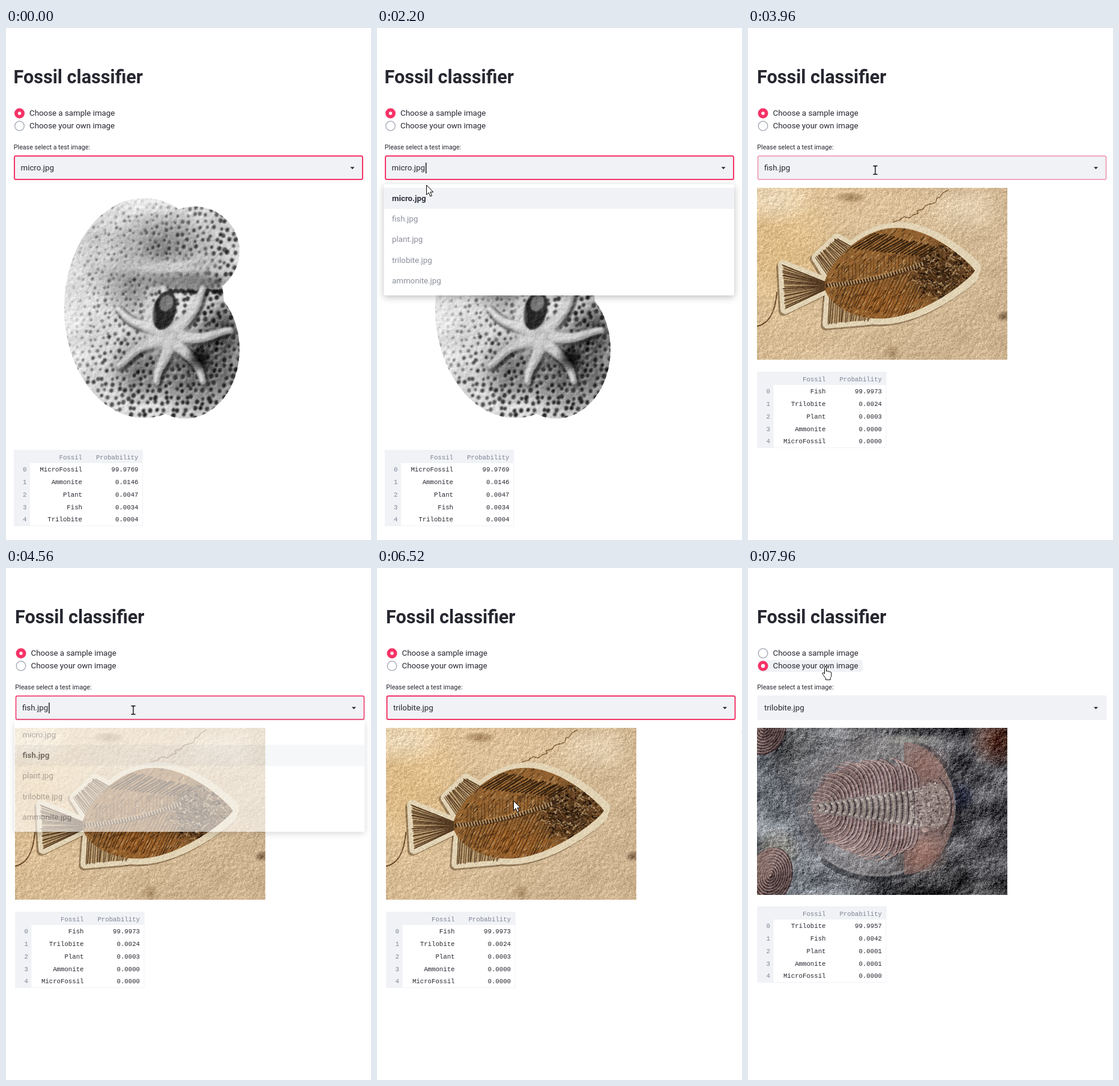
Recreate the animation shown at these times as an HTML page with a canvas. Size 608 by 852 pixels, loop 8000 ms.

```html
<!DOCTYPE html>
<html lang="en">
<head>
<meta charset="utf-8">
<title>Fossil classifier</title>
<style>
html, body { margin: 0; width: 100%; height: 100%; overflow: hidden; background: #fff; }
#stage { position: relative; width: 608px; height: 852px; overflow: hidden; background: #fff; }
canvas, svg { position: absolute; left: 0; top: 0; }
canvas { top: 266px; }
text { font: 13.3px Roboto, sans-serif; fill: #262730; }
.title { font-size: 30.6px; font-weight: 700; }
.label { font-size: 10.7px; }
.mono { font: 10.7px "Liberation Mono", monospace; text-anchor: end; }
.dim { fill: #7f8494; }
#sheet { filter: drop-shadow(0 3px 6px rgba(0, 0, 0, .25)); }
</style>
</head>
<body>
<div id="stage"></div>
<script>
const LOOP = 8000, STEP = 40;
const stage = document.getElementById('stage');
const lerp = (a, b, p) => a + (b - a) * p;
const ramp = (t, a, b) => Math.min(1, Math.max(0, (t - a) / (b - a)));
const ease = p => p * p * (3 - 2 * p);

/* ---------- painting helpers ---------- */
let seed = 7;
function rnd(a = 0, b = 1) {
  seed = (seed * 1664525 + 1013904223) % 4294967296;
  return a + (b - a) * seed / 4294967296;
}
function hash(x, y) {
  const n = Math.sin(x * 127.1 + y * 311.7) * 43758.5453;
  return n - Math.floor(n);
}
function noise(x, y) {
  const i = Math.floor(x), j = Math.floor(y), u = ease(x - i), v = ease(y - j);
  return lerp(lerp(hash(i, j), hash(i + 1, j), u), lerp(hash(i, j + 1), hash(i + 1, j + 1), u), v);
}
// Lit bumps, broad patches and fine grain over everything painted so far.
function rough(c, size, relief, grain, patch = 0) {
  const { width: w, height: h } = c.canvas, img = c.getImageData(0, 0, w, h), d = img.data;
  const bump = (x, y) => noise(x / size, y / size) + .5 * noise(x * 2.7 / size, y * 2.7 / size);
  for (let y = 0; y < h; y++) for (let x = 0; x < w; x++) {
    const k = (y * w + x) * 4;
    if (!d[k + 3]) continue;
    const add = (bump(x + 1.5, y + 1.5) - bump(x, y)) * relief + (hash(x, y) - .5) * grain
      + (noise(x / 34, y / 28) - .5) * patch;
    for (let n = 0; n < 3; n++) d[k + n] += add;
  }
  c.putImageData(img, 0, 0);
}
function blur(c, r) {
  c.save();
  c.setTransform(1, 0, 0, 1, 0, 0);
  c.globalCompositeOperation = 'source-atop';
  c.filter = `blur(${r}px)`;
  c.drawImage(c.canvas, 0, 0);
  c.restore();
}
function soft(c, x, y, rx, ry, rgb, a) {
  const g = c.createRadialGradient(0, 0, 0, 0, 0, 1);
  g.addColorStop(0, `rgba(${rgb},${a})`);
  g.addColorStop(.5, `rgba(${rgb},${a * .6})`);
  g.addColorStop(1, `rgba(${rgb},0)`);
  c.save();
  c.translate(x, y);
  c.scale(rx, ry);
  c.fillStyle = g;
  c.fillRect(-1, -1, 2, 2);
  c.restore();
}
function fill(c, color) { c.fillStyle = color; c.fill(); }
function pen(c, color, w) { c.strokeStyle = color; c.lineWidth = w; c.stroke(); }
function oval(c, x, y, rx, ry, color, turn = 0) {
  c.beginPath();
  c.ellipse(x, y, rx, ry, turn, 0, 7);
  fill(c, color);
}
function line(c, x, y, u, v, color, w) {
  c.beginPath();
  c.moveTo(x, y);
  c.lineTo(u, v);
  pen(c, color, w);
}
function curve(c, x, y, cx, cy, u, v, color, w) {
  c.beginPath();
  c.moveTo(x, y);
  c.quadraticCurveTo(cx, cy, u, v);
  pen(c, color, w);
}
// n strokes between a base segment and a tip segment.
function rays(c, n, [ax, ay, bx, by], [px, py, qx, qy], color, w) {
  for (let i = 0; i < n; i++) {
    const s = i / (n - 1);
    line(c, lerp(ax, bx, s), lerp(ay, by, s),
      lerp(px, qx, s) + rnd(-2, 2), lerp(py, qy, s) + rnd(-2, 2), color, w * rnd(.6, 1.2));
  }
}
function picture(h, x, paint) {
  const cv = document.createElement('canvas');
  cv.width = 417;
  cv.height = h;
  stage.append(cv);
  const c = cv.getContext('2d', { willReadFrequently: true });
  c.lineCap = c.lineJoin = 'round';
  c.translate(-x, -266);
  paint(c);
  return cv;
}

/* ---------- pictures ---------- */
function paintMicro(c) {
  c.save();
  c.beginPath();
  c.ellipse(230, 466, 133, 183, 0, 0, 7);
  c.closePath();
  c.ellipse(314, 371, 75, 74, 0, 0, 7);
  c.closePath();
  c.ellipse(298, 535, 91, 115, 0, 0, 7);
  fill(c, '#d4d4d4');
  c.clip();
  soft(c, 325, 560, 95, 85, '15,15,15', .75);
  soft(c, 365, 500, 45, 60, '15,15,15', .7);
  soft(c, 225, 570, 60, 60, '30,30,30', .5);
  soft(c, 265, 365, 95, 70, '40,40,40', .45);
  soft(c, 205, 430, 55, 65, '40,40,40', .4);
  for (let row = 0; row < 34; row++) for (let col = 0; col < 26; col++) {
    const x = 96 + col * 12 + row % 2 * 6 + rnd(-4, 4), y = 290 + row * 10.8 + rnd(-3.5, 3.5);
    const deep = ramp(x + y * .6, 310, 620), r = 1.2 + 1.7 * deep + rnd(-.5, .8), a = .3 + .5 * deep + rnd(-.15, .1);
    oval(c, x + 1.2, y + 1.5, r + 2, r + 2, 'rgba(235,235,235,.3)');
    oval(c, x, y, r + .9, r + 1.1, `rgba(70,70,70,${a * .5})`, .4);
    oval(c, x, y, r, r * 1.2, `rgba(18,18,18,${a})`, .4);
  }
  soft(c, 245, 398, 120, 20, '215,215,215', .9);
  soft(c, 325, 392, 50, 22, '190,190,190', .7);
  soft(c, 302, 423, 85, 22, '105,105,105', 1);
  soft(c, 302, 425, 70, 12, '135,135,135', .9);
  for (let x = 256; x < 370; x += 3)
    oval(c, x, 438 + rnd(-2, 2), 3, rnd(1.5, 4), '#222');

  // Spokes of overlapping discs: a shadow pass, then two lighter ones.
  const spokes = [0, 1, 2, 3, 4, 5, 6];
  for (const [d, grow, color] of [[3, 3, 'rgba(40,40,40,.28)'], [0, 0, '#a6a6a6'], [-1.5, -3, '#d2d2d2']])
    for (const i of spokes) for (let s = .2; s <= 1; s += .04) {
      const a = i * .9 + .09 * Math.sin(s * 5 + i * 2), len = 95 + 12 * Math.sin(i * 2 + 1);
      oval(c, 273 + d + len * s * Math.cos(a), 512 + d + len * s * Math.sin(a),
        Math.max(1, lerp(11, 5.5, s) + grow), Math.max(1, lerp(11, 5.5, s) + grow), color);
    }
  soft(c, 268, 514, 58, 46, '208,208,208', 1);
  oval(c, 264, 470, 19, 33, '#2b2b2b', .25);
  oval(c, 267, 458, 11, 14, '#777', .5);
  soft(c, 237, 478, 14, 42, '222,222,222', .9);
  soft(c, 322, 550, 24, 26, '10,10,10', .9);
  soft(c, 105, 470, 45, 150, '240,240,240', .7);
  soft(c, 225, 288, 110, 25, '235,235,235', .7);
  blur(c, .9);
  c.restore();
  rough(c, 5, 34, 16, 26);
}

// Body outline, widened by `grow` for the chipped edge around it.
function fishBody(c, grow) {
  c.beginPath();
  for (let i = 0; i <= 80; i++) {
    const side = i <= 40 ? -1 : 1, s = (side < 0 ? i : 80 - i) / 40;
    const half = 8 * (1 - s) + 70 * Math.max(0, Math.sin(Math.PI * s ** .85)) ** .82 + grow * (1 - s * .3);
    c.lineTo(128 + s * (250 + grow), 428 - 24 * s + side * half - 10 * Math.sin(Math.PI * s));
  }
  c.closePath();
}
function paintFish(c) {
  const bg = c.createLinearGradient(15, 266, 432, 552);
  bg.addColorStop(0, '#dec093');
  bg.addColorStop(.5, '#d5bb96');
  bg.addColorStop(1, '#cbb18e');
  c.fillStyle = bg;
  c.fillRect(15, 266, 417, 286);
  soft(c, 60, 370, 110, 110, '225,188,130', .7);
  soft(c, 45, 285, 70, 45, '246,232,208', .7);
  soft(c, 365, 300, 70, 45, '236,220,194', .6);
  soft(c, 170, 282, 28, 10, '120,85,45', .6);
  soft(c, 426, 480, 14, 10, '90,65,40', .7);
  soft(c, 240, 540, 14, 14, '135,105,70', .5);
  c.beginPath();
  for (let s = 0; s <= 1; s += .05) c.lineTo(330 - 100 * s + rnd(-4, 4), 267 + 64 * s ** .7 + rnd(-3, 3));
  pen(c, '#80603a', 1.5);
  curve(c, 48, 440, 44, 490, 16, 496, '#67482a', 2);
  rough(c, 5, 34, 18, 14);

  const fins = [
    [[132, 424, 132, 434], [58, 394, 62, 468], 24],
    [[134, 414, 176, 366], [114, 382, 148, 350], 18],
    [[136, 440, 205, 474], [132, 492, 202, 486], 20],
    [[170, 366, 292, 380], [212, 341, 315, 366], 18]];
  const shape = ([b, t]) => {
    c.beginPath();
    c.moveTo(b[0], b[1]);
    c.lineTo(t[0], t[1]);
    c.lineTo(t[2], t[3]);
    c.lineTo(b[2], b[3]);
    c.closePath();
  };
  for (const [d, color] of [[-3, 'rgba(95,70,40,.55)'], [0, '#e2d3b5']]) {
    c.save();
    c.translate(d, -d);
    fins.forEach(f => { shape(f); pen(c, color, 16); });
    fishBody(c, 11);
    fill(c, color);
    c.restore();
  }
  fins.forEach(f => { shape(f); fill(c, '#b79a6f'); rays(c, f[2], f[0], f[1], '#543a22', 1.5); });

  c.save();
  fishBody(c, 0);
  fill(c, '#8f602f');
  c.clip();
  soft(c, 225, 455, 75, 35, '160,92,32', .7);
  for (let i = 0; i < 1100; i++) {
    const x = rnd(130, 310), y = rnd(330, 495), l = rnd(2, 7);
    line(c, x, y, x - l, y + l * 1.1,
      ['rgba(50,30,14,.6)', 'rgba(178,112,52,.6)', 'rgba(215,182,130,.45)'][i % 3], rnd(.7, 1.8));
  }
  rays(c, 28, [150, 424, 310, 388], [150, 398, 310, 362], 'rgba(60,36,16,.5)', 1.5);
  rays(c, 26, [152, 430, 310, 398], [140, 460, 270, 482], 'rgba(52,30,14,.6)', 1.7);
  soft(c, 325, 408, 66, 60, '42,26,14', .85);
  for (let i = 0; i < 620; i++) {
    const a = rnd(0, 6.3), r = Math.sqrt(rnd()), x = 328 + 52 * r * Math.cos(a), y = 408 + 46 * r * Math.sin(a);
    line(c, x, y, x + rnd(-6, 6), y + rnd(-5, 5),
      ['rgba(30,18,10,.8)', 'rgba(115,76,42,.7)', 'rgba(195,165,120,.6)'][i % 3], rnd(.8, 2.6));
  }
  c.restore();
  rays(c, 20, fins[3][0], fins[3][1], '#33200f', 2.2);
  curve(c, 132, 428, 220, 424, 296, 390, 'rgba(60,38,20,.7)', 7);
  for (let s = 0; s <= 1; s += .03) {
    const x = lerp(134, 292, s), y = 428 - 36 * s ** 1.5;
    line(c, x - 1, y - 3, x + 1, y + 3, '#c8ad82', 1.6);
  }
  blur(c, .5);
  rough(c, 3, 14, 24);
}

function paintTrilobite(c) {
  const bg = c.createLinearGradient(40, 500, 429, 330);
  bg.addColorStop(0, '#7a7f87');
  bg.addColorStop(.5, '#68686b');
  bg.addColorStop(1, '#454448');
  c.fillStyle = bg;
  c.fillRect(13, 266, 417, 278);
  soft(c, 75, 300, 55, 80, '45,44,42', .6);
  soft(c, 412, 285, 48, 50, '105,55,38', .75);
  soft(c, 350, 380, 30, 30, '35,40,75', .6);
  soft(c, 320, 545, 150, 40, '40,40,42', .8);
  soft(c, 45, 470, 45, 40, '110,98,72', .5);
  rough(c, 17, 110, 20, 60);
  rough(c, 6, 55, 20);
  oval(c, 212, 398, 132, 116, 'rgba(128,122,122,.35)');
  for (const [r, color, w] of [[136, 'rgba(35,34,38,.5)', 9], [128, 'rgba(165,163,163,.4)', 4]]) {
    c.beginPath();
    c.ellipse(214, 397, r, r * .89, 0, -1.1, 2.3);
    pen(c, color, w);
  }
  soft(c, 270, 286, 55, 10, '150,150,142', .8);

  c.beginPath();
  c.ellipse(258, 400, 84, 110, 0, -Math.PI / 2, Math.PI / 2);
  fill(c, 'rgba(132,106,101,.8)');
  soft(c, 290, 475, 45, 40, '160,105,90', .5);
  soft(c, 295, 330, 42, 40, '150,105,95', .5);
  oval(c, 206, 400, 100, 78, '#85716f');
  for (const side of [-1, 1]) for (let i = 0; i < 28; i++) {
    const s = i / 27, x = 116 + s * 164, y = 400 + side * (5 + 23 * s), a = Math.PI * (1 - .68 * s);
    const out = rnd(.96, 1.1), tx = 208 + 100 * out * Math.cos(a), ty = 400 + side * 79 * out * Math.sin(a);
    curve(c, x + 2.6, y, x + 2, ty, tx + 2.6, ty, '#55464a', 2);
    curve(c, x, y, x, ty, tx, ty, i % 3 ? '#ad9691' : '#a58884', rnd(1.6, 2.6));
  }
  for (let s = 0; s <= 1; s += 1 / 17) {
    const x = 118 + s * 168, h = 4 + 25 * s;
    curve(c, x, 399 - h, x + 5, 399, x, 399 + h, '#8f8481', 11);
    curve(c, x - 3, 399 - h, x + 2, 399, x - 3, 399 + h, '#50474a', 2.4);
    curve(c, x + 2, 399 - h, x + 7, 399, x + 2, 399 + h, '#b0a49d', 2.4);
    for (const side of [-1, 1]) oval(c, x, 399 + side * h, 2.4, 1.8, '#c2b6ad');
  }
  oval(c, 306, 395, 31, 38, '#8d7d79');
  for (let i = 0; i < 200; i++) {
    const a = rnd(0, 6.3), r = Math.sqrt(rnd());
    oval(c, 304 + 36 * r * Math.cos(a), 396 + 42 * r * Math.sin(a), rnd(.8, 2.4), rnd(.8, 2),
      i % 2 ? '#b0a39e' : '#5d4d4d');
  }
  oval(c, 295, 438, 11, 8, '#705b58');
  oval(c, 293, 436, 6, 4, '#a98f88');
  curve(c, 318, 350, 355, 395, 320, 442, 'rgba(50,42,45,.6)', 3);
  for (const [x, y] of [[26, 264], [36, 512]]) for (let k = 1; k > .1; k -= .1) {
    oval(c, x, y, 36 * k, 48 * k, '#4a3b3d', .25);
    oval(c, x - 1, y - 1, 36 * k - 1.5, 48 * k - 2, '#937a75', .25);
  }
  blur(c, .6);
  rough(c, 5, 48, 38, 30);
}

const pics = [picture(386, 13, paintMicro), picture(286, 15, paintFish), picture(278, 13, paintTrilobite)];

/* ---------- interface ---------- */
function set(e, attrs) { for (const k in attrs) e.setAttribute(k, attrs[k]); }
function el(tag, attrs, parent, text) {
  const e = document.createElementNS('http://www.w3.org/2000/svg', tag);
  set(e, attrs);
  if (text) e.textContent = text;
  parent.append(e);
  return e;
}
const show = (e, on) => { e.style.display = on ? '' : 'none'; };
const PINK = '#f63366', PALE = '#f0f2f6', ROW = 34.3;

const svg = el('svg', { width: 608, height: 852 }, stage);
const page = el('g', {}, svg);
el('text', { x: 12.5, y: 92, class: 'title' }, page, 'Fossil classifier');
const radios = ['Choose a sample image', 'Choose your own image'].map((name, i) => {
  const g = el('g', { transform: `translate(0 ${i * 21})` }, page);
  const hover = el('rect', { x: 14, y: 132, width: 174.5, height: 20, rx: 4, fill: PALE }, g);
  const ring = el('circle', { cx: 22.5, cy: 142 }, g);
  const dot = el('circle', { cx: 22.5, cy: 142, fill: '#fff' }, g);
  el('text', { x: 39, y: 146.3 }, g, name);
  return { hover, ring, dot };
});
el('text', { x: 12.8, y: 202, class: 'label' }, page, 'Please select a test image:');
el('rect', { x: 13, y: 212, width: 582, height: 41, rx: 3, fill: PALE }, page);
const border = el('rect', { x: 14, y: 213, width: 580, height: 39, rx: 2.5, fill: 'none', stroke: PINK, 'stroke-width': 2 }, page);
const value = el('text', { x: 24.5, y: 237 }, page, ' ');
const caret = el('rect', { y: 224, width: 1.4, height: 18, fill: '#111' }, page);
el('path', { d: 'M573.5 231.3h7l-3.5 3.6z', fill: '#262730' }, page);
const button = el('rect', { x: 605, y: 271, width: 5, height: 5, fill: '#d2d2d4' }, page);

const wait = el('g', {}, page);
el('rect', { x: 13.5, y: .5, width: 581, height: 42, rx: 3, fill: '#fdf2d5', stroke: '#f3d55b' }, wait);
el('text', { x: 30, y: 26, style: 'fill:#8d6c22' }, wait, 'Wait for it...Predicting...');

const table = el('g', {}, page);
el('rect', { x: 13.5, y: .5, width: 214, height: 126, fill: '#fff', stroke: PALE }, table);
el('path', { d: 'M13 0H228V22H40V127H13Z', fill: PALE }, table);
const cell = (x, y, cls, text) => el('text', { x, y, class: 'mono ' + cls }, table, text);
cell(127, 15.7, 'dim', 'Fossil');
cell(220.5, 15.7, 'dim', 'Probability');
const cells = [0, 1, 2, 3, 4].flatMap(i => {
  const y = 35.8 + i * 20.9;
  cell(34.5, y, 'dim', String(i));
  return [cell(127, y, '', ' '), cell(220.5, y, '', ' ')];
});
const results = [
  'MicroFossil 99.9769 Ammonite 0.0146 Plant 0.0047 Fish 0.0034 Trilobite 0.0004',
  'Fish 99.9973 Trilobite 0.0024 Plant 0.0003 Ammonite 0.0000 MicroFossil 0.0000',
  'Trilobite 99.9957 Fish 0.0042 Plant 0.0001 Ammonite 0.0001 MicroFossil 0.0000'
].map(s => s.split(' '));

const files = ['micro', 'fish', 'plant', 'trilobite', 'ammonite'].map(s => s + '.jpg');
const popup = el('g', {}, page);
el('rect', { id: 'sheet', x: 11.5, y: 260, width: 583.5, height: 185, rx: 3, fill: '#fff' }, popup);
const mark = el('rect', { x: 11.5, width: 583.5, height: 35, fill: PALE }, popup);
const options = files.map((f, i) => el('text', { x: 25, y: 287.7 + i * ROW }, popup, f));

const ink = { fill: '#fff', stroke: '#000', 'stroke-linejoin': 'round' };
const pointer = el('g', {}, svg);
const shapes = {
  arrow: el('path', { ...ink, d: 'M.5 .5V16.5L4.2 13 6.8 19.2 9.4 18.1 6.8 12H11.8Z' }, pointer),
  beam: el('path', { d: 'M-3.5-6.5h2.5l1 1 1-1h2.5M0-5.5v12M-3.5 7.5h2.5l1-1 1 1h2.5', fill: 'none', stroke: '#000', 'stroke-width': 1.3 }, pointer),
  hand: el('path', { ...ink, transform: 'translate(-5.5 0)', d: 'M4 1.8a1.5 1.5 0 0 1 3 0V8c1-1 3-.8 3 .6 1-1 2.6-.7 2.8.6 1-.6 2.6-.2 2.6 1.4V15c0 2-1.4 3-1.8 4.5V22H6v-2C5 18 2 14.5.6 12.3c-.8-1.5.8-2.6 2-1.6L4 12Z' }, pointer)
};

/* ---------- timeline ---------- */
const since = (t, ...marks) => marks.filter(m => t >= m).length;
// Value that fades on, off, on... at the given times.
const swing = (t, ...marks) => marks.reduce((v, m, i) => v + (i % 2 ? -1 : 1) * ramp(t, m, m + 200), 0);

const picAt = t => since(t, 3200, 6800);
const busyAt = t => since(t, 3400, 3920, 6560, 7080) % 2;
const openAt = t => swing(t, 1960, 2800, 4440, 5760);
// A tall page has a scrollbar, which moves the centred column left.
const tallAt = t => picAt(t) === 0 || busyAt(t);

// start, end, x, y of each pointer move
const moves = [[720, 880, 168, 353], [1080, 1840, 80, 234], [2040, 2200, 82, 261], [2280, 2640, 70, 318],
  [3400, 3560, 212, 236], [4880, 5400, 187, 379], [6480, 6640, 443, 430], [7120, 7840, 129, 164]];
const pointerAt = t => moves.reduce(([x, y], [a, b, u, v]) => {
  const p = ease(ramp(t, a, b));
  return [lerp(x, u, p), lerp(y, v, p)];
}, [302, 645]);

function render(t) {
  const pic = picAt(t), busy = busyAt(t), open = openAt(t);
  const shift = tallAt(t) || tallAt(t - STEP) ? 0 : 2.5;
  pics.forEach((p, i) => { show(p, i === pic); p.style.left = 13 + Math.floor(shift) + 'px'; });
  set(page, { transform: `translate(${shift} 0)` });

  const top = [702, 572, 563][pic], data = results[since(t, 3920, 7080)];
  show(wait, busy);
  set(wait, { transform: `translate(0 ${top})` });
  set(table, { transform: `translate(0 ${top + busy * 57})`, opacity: busy ? .36 : 1 });
  cells.forEach((c, i) => { c.textContent = data[i]; });

  const focus = 1 - swing(t, 1080, 1920, 3840, 4400, 7680);
  const typing = since(t, 1920, 3840, 4440, 5800) % 2, blink = t - (t < 4000 ? 1920 : 4440);
  value.textContent = files[[0, 1, 3][since(t, 2840, 5800)]];
  set(border, { opacity: focus });
  show(caret, typing && Math.floor(blink / 530) % 2 === 0);
  set(caret, { x: 25.5 + value.getComputedTextLength() });

  const [x, y] = pointerAt(t);
  const chosen = since(t, 4000);
  const over = open > .5 && y > 266 && y < 438 ? Math.floor((y - 266) / ROW) : -1;
  show(popup, open > .01);
  set(popup, { opacity: open, transform: `translate(0 ${-15 * (1 - open)})` });
  set(mark, { y: 266 + chosen * ROW });
  options.forEach((o, i) => {
    o.style.fontWeight = i === chosen ? 700 : 400;
    o.style.fill = i === chosen ? '#31333f' : i === over ? '#555866' : '#8b8f9b';
  });

  const aim = x > 14 && x < 191 && y > 131 && y < 174 ? since(y, 153) : -1;
  const on = since(t, 7920);
  radios.forEach((r, i) => {
    const hit = i === on;
    show(r.hover, i === aim);
    set(r.ring, { r: hit ? 8.5 : 7.8, fill: hit ? PINK : '#fff', stroke: hit ? 'none' : '#a3a8b4', 'stroke-width': 1.3 });
    set(r.dot, { r: hit ? 2.7 + on * .5 : 0 });
  });
  show(button, t >= 1080 && y > 266 && openAt(t - 120) < .01 && open < .01);

  const kind = aim >= 0 || over >= 0 ? 'hand' : y > 212 && y < 253 && x < 560 ? 'beam' : 'arrow';
  for (const k in shapes) show(shapes[k], k === kind);
  show(pointer, t >= 720);
  set(pointer, { transform: `translate(${Math.round(x)} ${Math.round(y)})` });
}

const start = performance.now();
function tick() {
  const t = (performance.now() - start) % LOOP;
  render(Math.floor(t / STEP) * STEP);
  requestAnimationFrame(tick);
}
tick();
</script>
</body>
</html>
```
